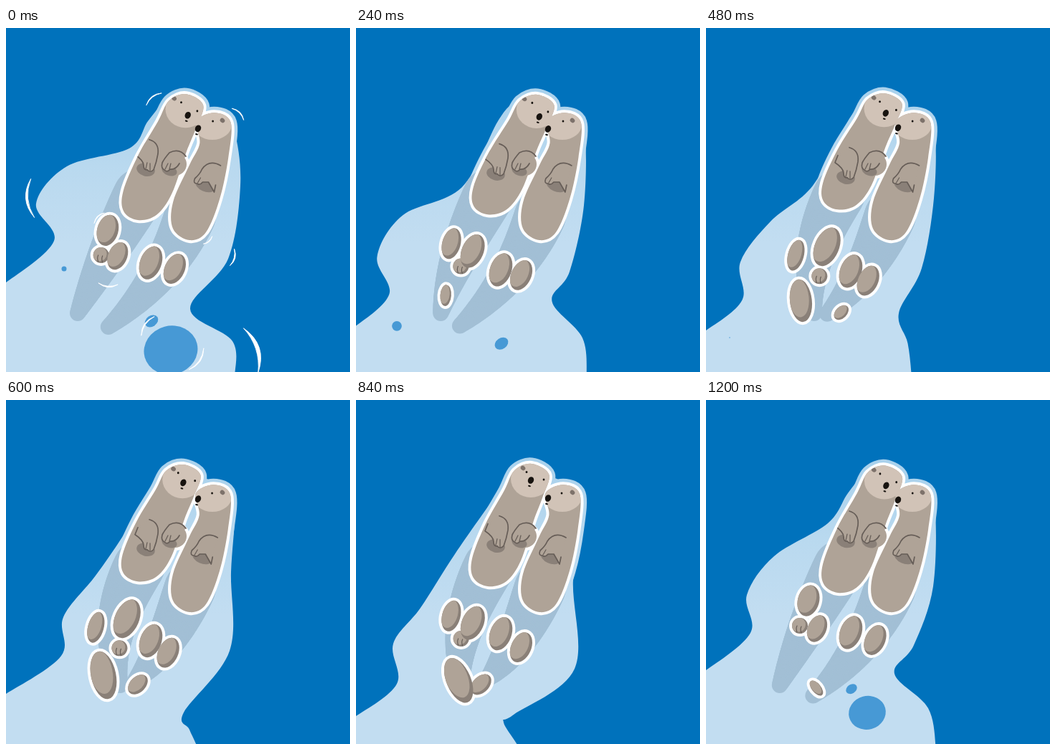
An HTML page with a canvas for the animation above (1290 ms loop, 480 by 480 pixels).

```html
<!DOCTYPE html>
<html lang="en">
<head>
<meta charset="utf-8">
<title>Floating otters</title>
<style>
html, body { margin: 0; width: 100%; height: 100%; overflow: hidden; background: #0072bc; }
canvas { display: block; width: 100vw; height: 100vh; }
</style>
</head>
<body>
<canvas id="stage" width="480" height="480"></canvas>
<script>
const LOOP = 1290;
const STEPS = [0, 30, 120, 150, 240, 360, 480, 600, 720, 750, 840, 870, 960, 990, 1080, 1200];
const C = {
  sea: '#0072bc', shade: '#a2bfd5', hole: '#4799d5', fur: '#afa397', furDark: '#8a8078',
  face: '#d1c3b7', ear: '#7d726b', line: '#665d57', ink: '#17130f', white: '#fff'
};
const ctx = document.getElementById('stage').getContext('2d');
const foamPaint = ctx.createLinearGradient(0, 85, 0, 300);
foamPaint.addColorStop(0, '#a9d1ec');
foamPaint.addColorStop(0.5, '#b9d9ef');
foamPaint.addColorStop(1, '#c2ddf1');

const nums = s => s.split(/[\s,]+/).map(Number);
const mix = (a, b, k) => a.map((v, i) => v + (b[i] - v) * k);

// Otter outlines, clockwise from the cheek; both bend with the swell.
const LEFT = nums('225,100 249,91 273,106 263,138 250,170 231,225 210,254 184,261 164,249 163,222 183,174 210,128');
const RIGHT = nums('265,130 290,118 313,131 310,180 298,238 279,284 256,295 233,279 233,242 256,190 270,160');

// Open water edge: left shore, notch, bulge, shoulder, waist | hip, bulge, notch, lip, bottom.
const FOAM = [
  [0, '0,355 67,297 42,245 85,193 172,168', '327,220 310,322 257,392 316,437 319,490'],
  [120, '0,397 69,340 43,288 75,228 160,195', '314,260 306,360 257,403 325,445 338,490'],
  [360, '0,434 24,402 16,350 55,295 135,250', '322,235 290,320 290,360 307,420 306,490'],
  [600, '0,410 77,357 80,303 125,245 163,190', '314,240 312,350 248,436 256,460 268,490'],
  [840, '0,441 57,396 52,340 90,290 138,215', '303,250 305,375 220,439 206,450 229,490'],
  [1080, '0,390 72,340 60,285 100,230 168,172', '316,290 278,368 290,402 316,445 318,490'],
  [1200, '0,377 62,325 57,272 95,218 170,172', '317,260 290,342 263,382 310,430 321,490']
].map(([at, left, right]) => ({ at, left: nums(left), right: nums(right) }));
FOAM.push({ ...FOAM[0], at: LOOP });

// Splash marks: middle x, y, direction, length, thickness, drift.
const SPLASHES = [
  [204, 96, 232, 27, 1.2, 3], [326, 118, -45, 23, 1.2, 4], [29, 238, 175, 54, 3, 9],
  [128, 263, 225, 20, 1, 14], [142, 361, 95, 27, 1.5, 2], [283, 298, 50, 16, 1, 13],
  [319, 321, 15, 24, 1.5, 12], [351, 447, -18, 65, 5, 44], [194, 413, 215, 32, 1.5, 4],
  [270, 465, 35, 36, 1.5, 3]
];

function points(list) {
  const out = [];
  for (let i = 0; i < list.length; i += 2) out.push([list[i], list[i + 1]]);
  return out;
}

// Smooth closed curve through the points.
function outline(p) {
  const n = p.length, path = new Path2D();
  path.moveTo(...p[0]);
  for (let i = 0; i < n; i++) {
    const a = p[(i + n - 1) % n], b = p[i], c = p[(i + 1) % n], d = p[(i + 2) % n];
    path.bezierCurveTo(b[0] + (c[0] - a[0]) / 6, b[1] + (c[1] - a[1]) / 6,
      c[0] - (d[0] - b[0]) / 6, c[1] - (d[1] - b[1]) / 6, c[0], c[1]);
  }
  path.closePath();
  return path;
}

// Shifts the head by (dx, dy) and the tail by `tail`, blending in between.
function bend(list, dx, dy, tail) {
  return outline(points(list).map(([x, y]) => {
    const k = Math.min(1, (y - 90) / 170);
    return [x + dx * (1 - k), y + dy * (1 - k) + tail * k];
  }));
}

function oval(x, y, rx, ry = rx, deg = 0) {
  const path = new Path2D();
  path.ellipse(x, y, Math.max(rx, 0), Math.max(ry, 0), deg * Math.PI / 180, 0, 7);
  return path;
}

function fill(path, color) {
  ctx.fillStyle = color;
  ctx.fill(path);
}

function stroke(path, color, width) {
  ctx.strokeStyle = color;
  ctx.lineWidth = width;
  ctx.stroke(path);
}

function clipped(path, draw) {
  ctx.save();
  ctx.clip(path);
  draw();
  ctx.restore();
}

function foamAt(t) {
  const i = FOAM.findIndex(f => f.at > t), a = FOAM[i - 1], b = FOAM[i];
  const k = (t - a.at) / (b.at - a.at);
  const left = points(mix(a.left, b.left, k)), right = points(mix(a.right, b.right, k));
  return outline([...left, [198, 130], [222, 104], [250, 100], [300, 120], [319, 145], ...right,
    [right[4][0], 530], [-40, 530], [-40, left[0][1] + 20]]);
}

// Tapered trail along a quadratic curve.
function shadow(x0, y0, cx, cy, x1, y1, r0, r1) {
  for (let i = 0; i <= 70; i++) {
    const k = i / 70, j = 1 - k;
    fill(oval(j * j * x0 + 2 * j * k * cx + k * k * x1,
      j * j * y0 + 2 * j * k * cy + k * k * y1, r0 + (r1 - r0) * k ** 1.3), C.shade);
  }
}

function splash([x, y, deg, len, w, drift], k) {
  const a = deg * Math.PI / 180, half = len * (1 - k * 0.25) / 2, path = new Path2D();
  ctx.save();
  ctx.translate(x + Math.cos(a) * drift * k, y + Math.sin(a) * drift * k);
  ctx.rotate(a);
  path.moveTo(-half * 0.3, -half);
  path.quadraticCurveTo(half * 0.3 + w, 0, -half * 0.3, half);
  path.quadraticCurveTo(half * 0.3 - w, 0, -half * 0.3, -half);
  fill(path, C.white);
  stroke(path, C.white, 0.8);
  ctx.restore();
}

function holes(t) {
  clipped(oval(240, 240, 400), () => {
    const big = (t + 290) % LOOP, mid = (t + 450) % LOOP;
    const r = Math.min(48, big * 0.13);
    if (big < 560) fill(oval(214 + big * 0.055, 430 + 55 * (big / 410) ** 3, r, r * 0.9, -15), C.hole);
    const m = 2 + 9 * Math.sin(Math.PI * (mid - 150) / 850);
    if (mid < 960) fill(oval(203, 397 + 70 * (mid / 810) ** 3, m, m * 0.75, -35), C.hole);
    const s = 7 * Math.sin(Math.PI * (t + 100) / 600);
    if (t < 500) fill(oval(81 - t * 0.1, 336 + 100 * (1 - Math.exp(-t / 150)), s), C.hole);
  });
}

function foot([x, y, rx, ry, deg]) {
  const path = oval(x, y, rx, ry, deg);
  fill(path, C.furDark);
  clipped(path, () => fill(oval(x - rx * 0.2, y - ry * 0.14, rx * 0.92, ry * 0.92, deg), C.fur));
}

function face(body, [x, y, rx, ry], ear, nose, eyes) {
  clipped(body, () => {
    fill(oval(x, y, rx, ry), C.face);
    fill(oval(...ear, 3.5, 3, 40), C.ear);
  });
  fill(oval(...nose, 4, 5, 25), C.ink);
  fill(oval(nose[0] - 2, nose[1] + 8, 2, 1.1, 15), C.ink);
  for (const e of eyes) fill(oval(...e, 1.4, 1.6), C.ink);
}

function limb(dx, dy, shade, lines, fingers) {
  ctx.save();
  ctx.translate(dx, dy);
  fill(shade, C.furDark);
  const path = new Path2D(lines);
  fill(path, C.fur);
  stroke(path, C.line, 1.7);
  stroke(new Path2D(fingers), C.line, 1.2);
  ctx.restore();
}

function render(t) {
  const wave = lag => Math.cos(2 * Math.PI * t / LOOP - lag);
  const kick = wave(-0.5), sway = wave(0), trail = wave(0.5), nod = wave(0.9), paddle = wave(-1.2);
  ctx.lineCap = ctx.lineJoin = 'round';
  ctx.fillStyle = C.sea;
  ctx.fillRect(0, 0, 480, 480);

  const left = bend(LEFT, 4 * nod, 2 * nod, 8 * kick);
  const right = bend(RIGHT, nod, 0, 1);
  const hand = oval(236, 190, 16, 16);
  const foam = foamAt(t);
  fill(foam, foamPaint);
  for (const body of [left, right]) stroke(body, foamPaint, 17);
  clipped(foam, () => {
    shadow(186, 232, 135, 325, 130 - 30 * sway, 398, 36, 11);
    shadow(257, 262, 222, 352, 163 - 23 * trail, 403 + 16 * trail, 36, 11);
  });
  holes(t);
  if (t < 240) for (const s of SPLASHES) splash(s, Math.min(t / 120, 1));

  for (const part of [left, right, hand]) stroke(part, C.white, 8);
  for (const part of [left, right, hand]) fill(part, C.fur);
  face(left, [248 + 4 * nod, 112 + 2 * nod, 28, 26], [234 + nod, 97 + 2 * nod],
    [250 + 6 * nod, 118 + 6 * nod], [[242 + 4 * nod, 102.5 + 2 * nod], [265 + 3 * nod, 114 + 3 * nod]]);
  face(right, [288, 135, 27, 21], [302, 129], [268, 139 + 2 * nod], [[288 + nod, 130]]);

  clipped(left, () => limb(-1, 1 - 6 * kick, oval(196, 202, 13, 9, 15),
    'M201 160Q215 164 213 180Q211 192 207 202Q202 207 198 202Q193 203 193 196Q193 189 181 181L185 171',
    'M196 201l2-9M202 203l0-10'));
  limb(-1, -2, oval(229, 201, 11, 7, 20),
    'M252 181Q243 169 229 176Q222 184 219 190Q217 198 222 200Q226 204 230 199Q238 200 243 191',
    'M223 199l4-8M229 199l2-8');
  clipped(right, () => limb(4 * nod - 4, 0, oval(279, 220, 14, 8, 25),
    'M301 192Q285 183 275 197Q272 204 265 210Q262 217 268 217Q272 220 276 215L284 215L292 229L294 219',
    'M269 216l4-7'));

  // Feet break the surface as x, y, rx, ry, angle; the low pair swells and sinks.
  const rise = Math.sin(Math.PI * (t - 60) / LOOP);
  const pop = Math.sin(Math.PI * (t - 260) / 950);
  const toe = [145 - 14 * kick, 331 - 16 * kick, 11, 11, 0];
  const feet = [
    toe,
    [134 + 9 * kick, 299 - 19 * kick, 13 + 2 * kick, 22, 15],
    [162 - 7 * kick, 312 + 7 * kick, 15 - 2 * kick, 24 - 4.5 * kick, 23],
    [202, 331 - 9 * paddle, 15, 24, 20],
    [231 + 5 * kick, 344 - 9 * kick, 14, 22, 24],
    [208 - t * 0.04, 397, 12 * pop, 18 * pop, 45],
    [118 + t * 0.03, 366 + t * 0.03, 18 * rise, 35 * rise, 15 - t * 0.045]
  ].filter(f => f[2] > 1);
  for (const f of feet) stroke(oval(...f), C.white, 8);
  feet.forEach(foot);
  stroke(new Path2D(`M${toe[0] - 4} ${toe[1]}q-2 4 0 9M${toe[0] + 2} ${toe[1] + 1}q-2 4 0 9`), C.line, 1.2);
}

let shown = -1;
function tick(now) {
  const t = now % LOOP;
  const step = STEPS.filter(s => s <= t).pop();
  if (step !== shown) render(shown = step);
  requestAnimationFrame(tick);
}
tick(0);
</script>
</body>
</html>
```
